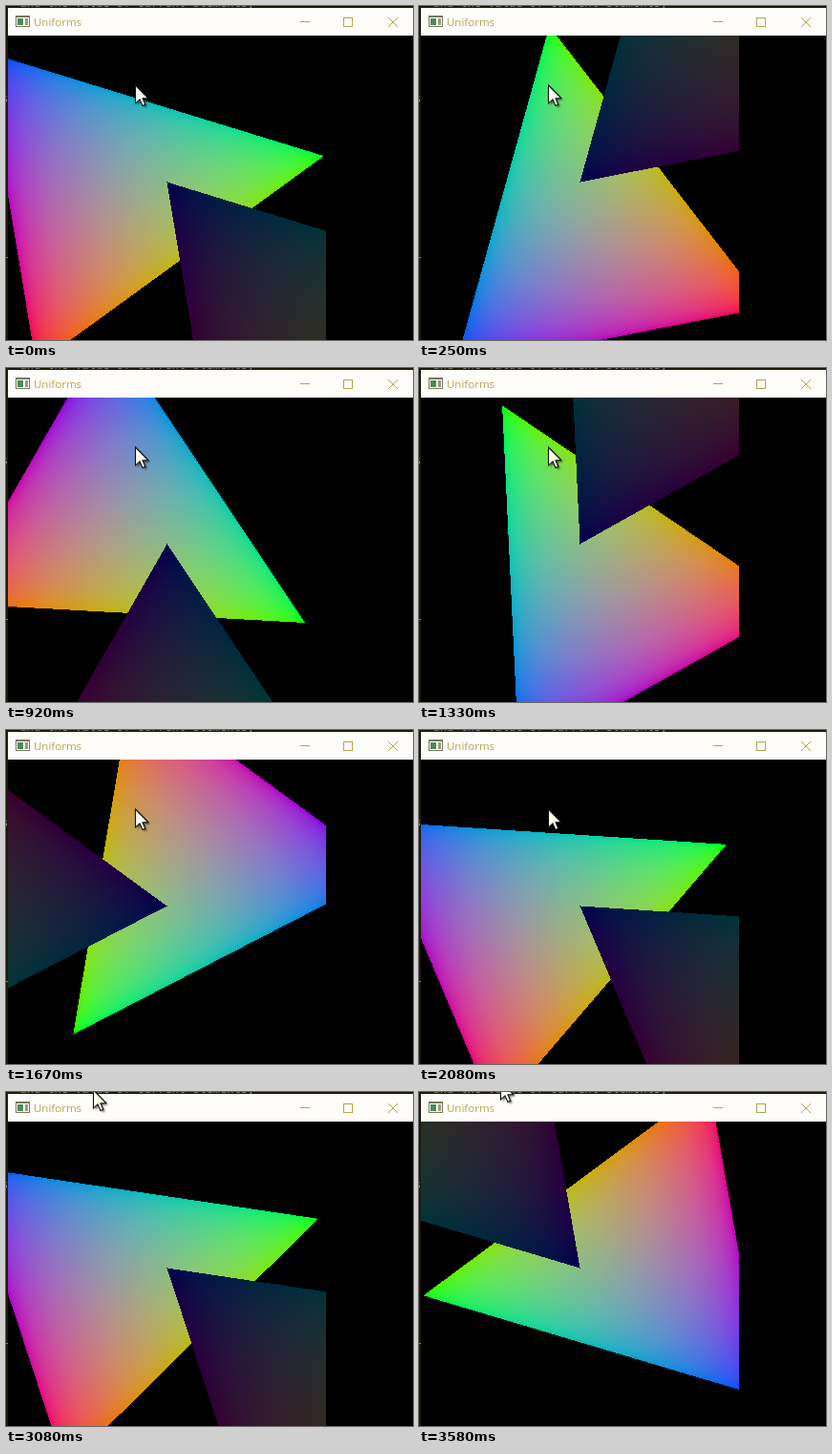
Animation of 426 by 350 pixels, one loop 3660 ms. Source, as an HTML page with a canvas:

```html
<!DOCTYPE html>
<html lang="en">
<head>
<meta charset="utf-8">
<title>Uniforms</title>
<style>
html, body { margin: 0; width: 100%; height: 100%; overflow: hidden; background: #000; }
canvas { display: block; }
</style>
</head>
<body>
<canvas id="stage" width="426" height="350"></canvas>
<script>
const ctx = document.getElementById('stage').getContext('2d');
const LOOP = 3660, LEFT = 2, TOP = 31, WIDTH = 333, HEIGHT = 319;
const CENTER = [168.5, 184.5], UNIT = 166.5;
const START = 1.406, TURN = 0.2, DIM = 0.07;
const INK = '#b9a14c';
const view = ctx.createImageData(WIDTH, HEIGHT);
const arrow = new Path2D('M0 0V17L4 13.3L6.6 19.2L9.2 18.1L6.7 12.3H12Z');

// Linear light to an sRGB byte
const encode = v => 255 * (v <= 0.0031308 ? 12.92 * v : 1.055 * v ** (1 / 2.4) - 0.055);

// Colour weights in the triangle (0,0) blue, (2,0) red, (1,2) green
function weights(x, y) {
  const g = y / 2, r = (x - g) / 2, b = 1 - r - g;
  return r >= 0 && g >= 0 && b >= 0 ? [r, g, b] : null;
}

function drawTriangles(angle) {
  const s = Math.sin(angle), c = Math.cos(angle), data = view.data;
  let i = 0;
  for (let row = 0; row < HEIGHT; row++) {
    const dy = (CENTER[1] - TOP - row - 0.5) / UNIT;
    for (let col = 0; col < WIDTH; col++) {
      const dx = (LEFT + col + 0.5 - CENTER[0]) / UNIT;
      const x = dx * c - dy * s, y = dx * s + dy * c;
      const front = weights(x, y);
      const color = front || weights(x + 1, y + 1) || [0, 0, 0];
      const gain = front ? DIM : 1;
      for (const v of color) data[i++] = encode(v * gain);
      data[i++] = 255;
    }
  }
  ctx.putImageData(view, LEFT, TOP);
}

function rect(color, x, y, w, h) {
  ctx.fillStyle = color;
  ctx.fillRect(x, y, w, h);
}

function text(str, x, y, font, color) {
  ctx.font = font;
  ctx.fillStyle = color;
  ctx.fillText(str, x, y);
}

function drawWindow() {
  rect('#1c1a08', 0, 0, 426, 2);
  rect('#1c1a08', 0, 0, 2, 350);
  const mono = '12px "DejaVu Sans Mono", monospace';
  text('s', -5, 101, mono, '#999');
  text('r', -5, 270, mono, '#999');
  text('  and the value of current elements;', 0, 1, mono, '#888');
  rect('#fffdfa', 2, 2, 424, 29);

  rect('#77775c', 10, 10, 15, 12);
  rect('#fff', 11, 12, 13, 9);
  rect('#4c8a58', 12, 13, 6, 7);
  rect('#99997c', 20, 13, 3, 7);
  text('Uniforms', 29, 21, '11.5px "Open Sans", "Noto Sans", sans-serif', INK);

  ctx.strokeStyle = INK;
  ctx.lineWidth = 1;
  rect(INK, 308, 16, 10, 1);
  ctx.strokeRect(353.5, 12.5, 9, 9);
  ctx.beginPath();
  ctx.moveTo(400, 12);
  ctx.lineTo(410, 22);
  ctx.moveTo(410, 12);
  ctx.lineTo(400, 22);
  ctx.stroke();
}

function cursorAt(step) {
  if (step < 36) return [135.5, 83];
  if (step === 36) return [119, 48];
  const k = Math.min(1, (step - 37) / 2);
  return [91.5 - 6 * k, -2 - 9 * k];
}

function drawCursor([x, y]) {
  ctx.save();
  ctx.translate(x, y);
  ctx.scale(1.12, 1.12);
  ctx.shadowColor = 'rgba(0,0,0,.5)';
  ctx.shadowOffsetX = ctx.shadowOffsetY = 2;
  ctx.shadowBlur = 2;
  ctx.fillStyle = '#fffff0';
  ctx.fill(arrow);
  ctx.shadowColor = 'transparent';
  ctx.strokeStyle = '#111';
  ctx.stroke(arrow);
  ctx.restore();
}

let shown = -1;
function frame() {
  const t = performance.now() % LOOP;
  // Twelve pictures a second, on a 10 ms clock
  const step = Math.floor((Math.floor(t / 10) * 10 + 5) * 0.012);
  if (step !== shown) {
    shown = step;
    rect('#000', 0, 0, 426, 350);
    drawTriangles(START - TURN * Math.round(step * 110 / 43));
    drawWindow();
    drawCursor(cursorAt(step));
  }
  requestAnimationFrame(frame);
}
frame();
</script>
</body>
</html>
```
